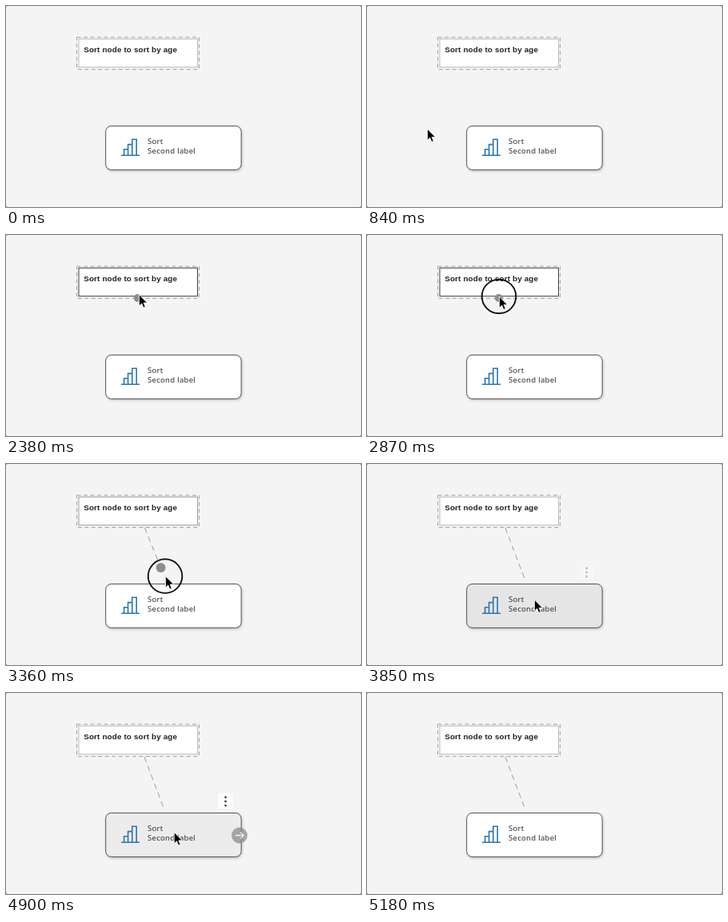
Animation, 444 px wide and 252 px high, one loop 5670 ms. Source, as an HTML page:

```html
<!DOCTYPE html>
<html lang="en">
<head>
<meta charset="utf-8">
<title>Link a comment to a node</title>
<style>
  html, body { margin: 0; width: 100%; height: 100%; overflow: hidden; background: #777; }
  svg { display: block; width: 444px; height: 252px; }
  .note { font: bold 9.9px "Liberation Sans", Arial, sans-serif; letter-spacing: .14px; fill: #202020; }
  .label { font: 9.6px "Noto Sans", sans-serif; letter-spacing: .25px; fill: #303030; }
  .dash { fill: none; stroke: #999; }
</style>
</head>
<body>
<svg viewBox="0 0 444 252">
  <defs>
    <filter id="shadow" x="-10%" y="-20%" width="120%" height="150%">
      <feDropShadow dx="1" dy="1.6" stdDeviation="1.5" flood-opacity=".2"/>
    </filter>
  </defs>
  <rect width="444" height="252" rx="2" fill="#f4f4f4"/>

  <line id="link" class="dash" stroke-dasharray="7 5"/>

  <rect class="dash" x="88.5" y="39.2" width="153" height="40.3" stroke-width=".9" stroke-dasharray="5 3.5"/>
  <rect id="note" x="91" y="41.3" width="148.5" height="35.4" fill="#fff"/>
  <text class="note" x="97.2" y="57.8">Sort node to sort by age</text>

  <rect id="node" x="124.7" y="150.4" width="169.5" height="55" rx="7" stroke="#505050" filter="url(#shadow)"/>
  <path d="M144 187.3H167M147.6 187V179.8H152.6M152.6 187V173.6H157.8M157.8 187V167.2H163.2V187"
        fill="none" stroke="#2a76b5" stroke-width="1.6"/>
  <text class="label" x="177" y="172.8">Sort</text>
  <text class="label" x="177" y="184.8">Second label</text>

  <g id="menu">
    <rect x="264.5" y="125" width="20.5" height="21" fill="#fff" stroke="#ececec" stroke-width=".6"/>
    <path d="M274.6 130.7v10.5" stroke="#161616" stroke-width="2.9" stroke-linecap="round" stroke-dasharray="0 5.2"/>
  </g>
  <g id="port">
    <circle cx="292" cy="178.5" r="10" fill="#8d8d8d"/>
    <path d="M287 178.5H297M293 174.5L297 178.5L293 182.5" fill="none" stroke="#fff" stroke-width="1.3"/>
  </g>

  <circle id="handle" fill="#8d8d8d"/>
  <g id="cursor">
    <circle id="ring" r="21.3" fill="none" stroke="#111" stroke-width="1.9"/>
    <path d="M.4 0V14.4L3.7 11.3L5.9 16.5L8.3 15.4L6.2 10.4H10.7Z" fill="#000" stroke="#fff" stroke-width=".9"/>
  </g>
</svg>
<script>
  const LOOP = 5670, STEP = 70;
  const ENTER = 70, PRESS = 2870, DRAG = 3150, DROP = 3780, LEAVE = 4830, GONE = 5180;

  const $ = id => document.getElementById(id);
  const set = (id, attrs) => {
    for (const k in attrs) $(id).setAttribute(k, attrs[k]);
  };
  const point = (x, y) => ({ x, y });
  const ramp = (t, from, to) => Math.min(1, Math.max(0, (t - from) / (to - from)));
  const within = (t, from, to) => t >= from && t < to ? 1 : 0;
  const grey = v => `rgb(${v},${v},${v})`;

  // Fades in from one time and out from another.
  const fade = (t, on, off, length = 280) => ramp(t, on, on + length) - ramp(t, off, off + length);

  // Resting places of the pointer and the curves between them.
  const outside = point(150, 240), low = point(73, 218), left = point(75, 154);
  const below = point(150, 86), hover = point(146, 72), grip = point(165, 77);
  const target = point(209, 170), exit = point(222, 242);
  const moves = [
    { start: ENTER, end: 490, from: outside, bend: point(8, 116), to: low },
    { start: 630, end: 840, from: low, bend: low, to: left },
    { start: 840, end: 1400, from: left, bend: point(130, 154), to: below },
    { start: 1400, end: 1610, from: below, bend: hover, to: hover },
    { start: 2100, end: 2520, from: hover, bend: point(172, 73), to: grip },
    { start: DRAG, end: 3640, from: grip, bend: point(218, 172), to: target },
    { start: LEAVE, end: 5110, from: target, bend: target, to: exit }
  ];

  function pointer(t) {
    const { start, end, from, bend, to } = moves.findLast(m => t >= m.start) || moves[0];
    const u = ramp(t, start, end), v = 1 - u;
    const curve = axis => v * v * from[axis] + 2 * u * v * bend[axis] + u * u * to[axis];
    return point(curve("x"), curve("y"));
  }

  // The link points from the comment's centre to its goal, trimmed at both ends.
  function drawLink(visible, goal, end) {
    const centre = point(165, 59), top = 80;
    const xAt = y => centre.x + (goal.x - centre.x) * (y - centre.y) / (goal.y - centre.y);
    set("link", {
      opacity: visible && end > top ? 1 : 0,
      x1: xAt(top), y1: top, x2: xAt(end), y2: end
    });
  }

  function draw(t) {
    const tip = pointer(t);
    const dragging = within(t, DRAG + STEP, DROP);
    const dropped = t >= DROP;
    const handle = dragging ? pointer(t - 45) : point(164.8, 79);
    const noteHover = fade(t, 1400, DRAG);
    const nodeHover = fade(t, 3430, LEAVE);

    set("cursor", { opacity: within(t, ENTER, GONE), transform: `translate(${tip.x} ${tip.y})` });
    set("ring", { opacity: within(t, PRESS, DROP) });
    set("handle", {
      cx: handle.x, cy: handle.y, r: dragging ? 6 : 5,
      opacity: t <= DRAG ? noteHover : dragging
    });
    set("note", { stroke: grey(185 - 125 * noteHover) });
    set("node", { fill: grey(255 - 26 * nodeHover) });
    set("menu", { opacity: fade(t, DROP, LEAVE) });
    set("port", { opacity: fade(t, 4200, LEAVE) });
    drawLink(dragging || dropped, dropped ? point(210, 178) : handle,
      dropped ? 144.5 : Math.min(handle.y - 7, 144.5));
  }

  const begin = performance.now();
  function tick() {
    const t = (performance.now() - begin) % LOOP;
    draw(Math.floor(t / STEP) * STEP);
    requestAnimationFrame(tick);
  }
  tick();
</script>
</body>
</html>
```
